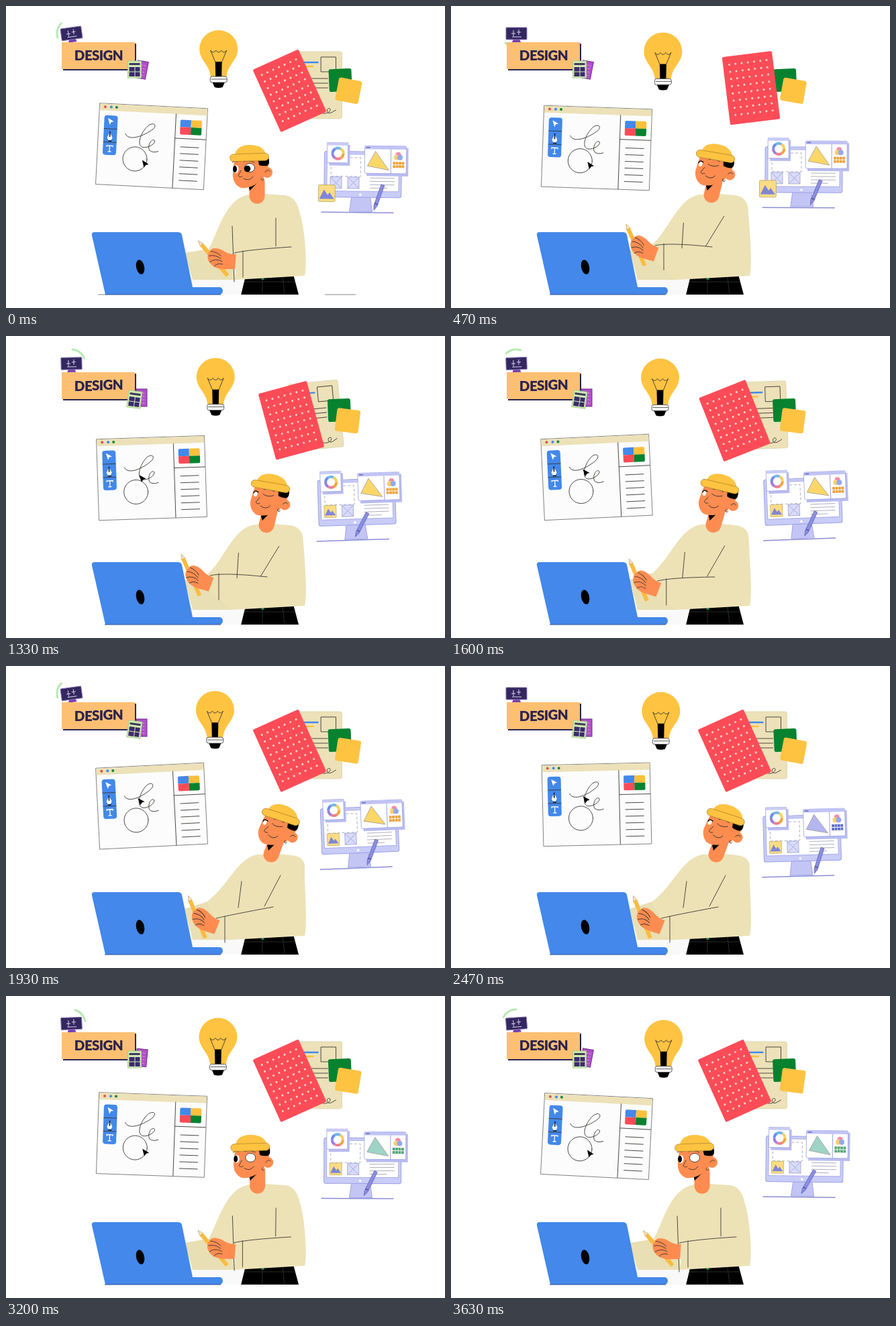
Recreate the animation shown at these times as an HTML page. Size 654 px wide and 450 px high, loop 3660 ms.

```html
<!DOCTYPE html>
<html lang="en">
<head>
<meta charset="utf-8">
<title>Design desk</title>
<style>
html, body { margin: 0; width: 100%; height: 100%; overflow: hidden; background: #fff; }
svg { display: block; width: 654px; height: 450px; }
.ln { fill: none; stroke: #3b3935; stroke-width: .9; stroke-linecap: round; stroke-linejoin: round; }
.skin { fill: #fe8c50; }
.lav { fill: #fff; stroke: #9da1e2; stroke-width: .8; }
.word { font: 900 20.5px Lato, "Open Sans", sans-serif; letter-spacing: -.6px; fill: #2b2350; text-anchor: middle; }
</style>
</head>
<body>
<svg viewBox="0 0 654 450">
  <!-- sign -->
  <path id="swoosh" d="M18 -11A21 21 0 0 1 18 11" fill="none" stroke="#a9e6a6" stroke-width="3" stroke-linecap="round" opacity=".85"/>
  <g id="mini">
    <path d="M-4 8H5L7 13H-6Z" fill="#7a3fb0"/>
    <rect x="-15" y="-9" width="31" height="18" rx="1" fill="#33275f" stroke="#8d79b8"/>
    <path d="M-4 -5V4M-7 0H-1M4 -6V2M1 -2H7M-6 5H8" stroke="#d9d3ee" fill="none"/>
  </g>
  <path d="M85 56H194V96H85Z" fill="#2a2350"/>
  <path d="M83 54H192V94H83Z" fill="#fdbf72"/>
  <text id="word" class="word" x="138" y="81">DESIGN</text>
  <g id="cardB">
    <rect x="-8" y="-13" width="16" height="26" fill="#b04fc6" stroke="#6b2f8e"/>
    <path d="M-5 -7H6M-5 -2H6M-5 3H6M-5 8H6" stroke="#e2a8ea" stroke-dasharray="2 1.5"/>
  </g>
  <g id="cardA">
    <rect x="-10" y="-12" width="20" height="25" fill="#d5eab4" stroke="#9fd08f"/>
    <path d="M-8 -9H8V-6H-8Z" fill="#3d3a5c"/>
    <path d="M-8 -3H0V3.500H-8ZM1 -3H8V3.500H1ZM-8 4.500H0V11H-8ZM1 4.500H8V11H1Z" fill="#3a2c6b"/>
  </g>

  <!-- bulb -->
  <g id="bulb">
    <path d="M-28.500 28.500A28.500 28.500 0 0 1 28.500 28.500C28 46 14 50 12 69H-12C-14 50 -28 46 -28.500 28.500Z" fill="#fec341"/>
    <path d="M-5 47H5L4.500 69H-4.500Z"/>
    <path class="ln" d="M-5 47L-12 30Q-8 36 -4 30Q0 36 4 30Q8 36 12 30L5 47"/>
    <rect x="-12.500" y="69" width="25" height="9" rx="3" fill="#fff" stroke="#333" stroke-width=".8"/>
    <path d="M-11 73H12" stroke="#333" stroke-width=".8"/>
    <path d="M-9 78H9L6 85Q0 87 -6 85Z"/>
  </g>

  <!-- drawing window -->
  <g id="win">
    <rect x="-80.500" y="-60.500" width="161" height="121" fill="#fcfcfc" stroke="#666" stroke-width=".8"/>
    <path d="M-80 -60H80V-50H-80Z" fill="#ece1b8"/>
    <circle cx="-72" cy="-55.500" r="2" fill="#e2533f"/>
    <circle cx="-63" cy="-55.500" r="2" fill="#4388ea"/>
    <circle cx="-55" cy="-55.500" r="2" fill="#16853c"/>
    <rect x="-72.500" y="-43" width="20" height="59" rx="4" fill="#4388ea"/>
    <path class="ln" d="M-72 -23H-53M-72 -3H-53M34 -50V60M34 -14H80"/>
    <path id="rows" class="ln"/>
    <path d="M-67 -39L-58 -34L-62 -33L-64 -29Z" fill="#fff"/>
    <path d="M-63 -18L-59 -10L-61 -6H-65L-67 -10Z" fill="#fff"/>
    <path d="M-65 -5H-60M-63 -19V-11" stroke="#111" stroke-width="1.500"/>
    <path d="M-67 4V2H-58V4M-62.500 2V11M-65 11H-60" fill="none" stroke="#fff" stroke-width="1.300"/>
    <path d="M57 -42V-31H41V-40Q41 -42 43 -42Z" fill="#4388ea"/>
    <path d="M57 -42V-31H73V-40Q73 -42 71 -42Z" fill="#fdc03c"/>
    <path d="M57 -20V-31H41V-22Q41 -20 43 -20Z" fill="#fc4b58"/>
    <path d="M57 -20V-31H73V-22Q73 -20 71 -20Z" fill="#07822f"/>
    <circle class="ln" cx="-24" cy="20" r="18"/>
    <path class="ln" d="M-40 -17C-35 -5 -12 -15 1 -26C8 -34 -2 -37 -9 -28C-19 -16 -22 0 -13 2C-4 3 6 -5 4 -9C-1 -13 -7 0 -3 6Q2 10 10 7"/>
    <path id="cursor" d="M-4 -5L6 1L2 2L-1 6Z"/>
  </g>

  <!-- folder -->
  <g id="doc">
    <rect x="-37" y="-50" width="74" height="100" rx="3" fill="#ece1b8" stroke="#d8cfaa" stroke-width=".7"/>
    <path d="M-22 -34H2" stroke="#4388ea" stroke-width="2.500"/>
    <path d="M-18 -28H-5" stroke="#fdc03c" stroke-width="2.500"/>
    <path class="ln" d="M6 -42H28V-20H6ZM-8 -10H16M-8 -3H16M-8 4H16M5 41C14 45 22 38 19 35C14 32 12 44 21 41L28 37"/>
  </g>
  <rect id="green" x="-17" y="-17" width="34" height="34" rx="3" fill="#07822f"/>
  <rect id="gold" x="-17.500" y="-17" width="35" height="34.500" rx="3" fill="#fec341"/>
  <g id="book">
    <rect x="-37.300" y="-51" width="74.600" height="102" rx="2" fill="#fd4c58"/>
  </g>

  <!-- big monitor -->
  <g id="mon">
    <path d="M-3 20H25L28 42H-6Z" fill="#c3c5f5" stroke="#a3a6e4"/>
    <path d="M-48 43.500H60" stroke="#8b8ed6" stroke-width="1.500"/>
    <rect x="-44" y="-47" width="115" height="68" rx="3" fill="#c9ccf7" stroke="#9da1e2"/>
    <path class="lav" d="M-40 -43H67V12H-40Z"/>
    <circle cx="10" cy="17" r="1.800" fill="#fff"/>
    <rect x="-34" y="-38" width="44" height="28" fill="none" stroke="#9c9eb8" stroke-dasharray="4 3" stroke-width=".8"/>
    <path d="M-35 -9h17v17h-17ZM-9 -9H8V8H-9ZM-35 -9l17 17M-18 -9l-17 17M-9 -9L8 8M8 -9L-9 8" fill="#d9dbfa" stroke="#9da1cc" stroke-width=".8"/>
    <path d="M24 -8H61M24 -3H61M24 2H61M24 7H50" stroke="#b0b0bf"/>
    <path d="M-37 -57h31v31h-31Z" fill="#b9bcf0"/>
    <path class="lav" d="M-40 -60h31v30h-31Z"/>
    <path d="M-40 -60h31v4h-31Z" fill="#c9ccf7"/>
    <g id="ring" fill="none" stroke-width="4"></g>
    <path d="M19 -53h62v42h-62Z" fill="#b9bcf0"/>
    <rect class="lav" x="16" y="-56" width="62" height="41" rx="2"/>
    <path d="M16 -56H78V-51H16Z" fill="#c0c3f4"/>
    <path d="M55 -51V-15" stroke="#9da1e2"/>
    <path d="M18 -53.500h6" stroke="#6669b8" stroke-width="1.500"/>
    <g opacity=".75"><circle cx="66" cy="-43" r="4" fill="#f0648c"/><circle cx="63.500" cy="-39" r="4" fill="#fdc03c"/><circle cx="68.500" cy="-39" r="4" fill="#6d8df0"/></g>
    <path id="swatch" d="M58 -30.500H75M58 -25.500H75" stroke-width="4" stroke-dasharray="3.800 .6"/>
    <path id="tri" d="M32 -48L52 -20L20 -26Z" stroke="#a09c9c" stroke-width=".8"/>
    <g id="pic">
      <rect x="-9" y="-9" width="18" height="18" rx="1" fill="#fbdc84" stroke="#b9a86a" stroke-width=".6"/>
      <path d="M-8 6L-3 -4L1 2L3 -1L8 6Z" fill="#7f86d6"/>
    </g>
    <g id="pen">
      <path d="M-2.500 -20H2.500V13L0 20L-2.500 13Z" fill="#8a8ee0" stroke="#6a6dbc" stroke-width=".8"/>
      <path d="M-2.500 10H2.500" stroke="#3d3f88"/>
    </g>
  </g>

  <!-- person -->
  <path d="M357 400H428L436 430H350Z"/>
  <path d="M355 411H431M382 404V429M412 404L415 429" fill="none" stroke="#2d3a36" stroke-width=".8"/>
  <path d="M380.500 405h4v3h-4Z" fill="#16853c"/>
  <path d="M276 405L358 398L350 430H276Z" fill="#f9f9f9"/>
  <path id="sleeve" fill="#e9dfb4"/>
  <path id="torso" fill="#ede2b6"/>
  <path id="folds" class="ln"/>
  <path id="neck" fill="none" stroke="#fe8c50" stroke-width="23" stroke-linecap="round"/>
  <path id="shade"/>
  <g id="head">
    <circle class="skin" cx="389" cy="248" r="8"/>
    <path class="skin" d="M341 229C338 238 339 244 338 250C337 259 342 268 350 271C360 273 375 266 383 257L391 238L388 226Z"/>
    <path d="M375 227L391 225Q394 236 389 238Q382 239 377 237Z"/>
    <path class="ln" d="M386 248Q389 242 393 246M350 245L346 253Q348 256 352 254M354 257Q363 262 368 254"/>
    <path class="ln" d="M381 256a2 2 0 1 0 3 2" stroke="#8a5a14"/>
    <g id="open">
      <path class="ln" d="M337 233Q341 230 345 232M354 232Q362 229 370 233"/>
      <ellipse cx="363" cy="241" rx="7.500" ry="6.500" fill="#fff" stroke="#222" stroke-width=".8"/>
      <ellipse cx="342.500" cy="243" rx="4" ry="6" fill="#fff"/>
      <ellipse cx="341" cy="243" rx="3" ry="5"/>
      <circle id="pupil" cx="359.500" cy="242.500" r="4.800"/>
    </g>
    <g id="wink">
      <path class="ln" d="M354 239Q361 243 370 238M354 232Q362 229 370 232"/>
      <g id="half"><ellipse cx="343" cy="241" rx="2.800" ry="4" fill="#fff"/><path d="M340 241Q340 235 347 238" fill="none" stroke="#111" stroke-width="1.500"/></g>
      <path id="shut" class="ln" d="M339 240Q343 243 347 240" stroke-width="1.800"/>
    </g>
    <path d="M341 223C341 212 352 207 363 207C376 207 386 212 387 222Z" fill="#fec341"/>
    <rect x="333.500" y="220" width="58" height="11" rx="5.500" fill="#fec341" stroke="#a98226" stroke-width=".7" transform="rotate(-2 363 225)"/>
  </g>
  <g id="hand">
    <g transform="translate(-33 -2) rotate(-44)">
      <path d="M-3 -26H3V34H-3Z" fill="#fbbb3f"/>
      <path d="M-3 -26L0 -34L3 -26Z" fill="#f6e3c0" stroke="#b78b3a" stroke-width=".5"/>
    </g>
    <path class="skin" d="M1 -10C-8 -9 -14 -12 -20 -15C-27 -18 -37 -18 -38 -12C-42 -8 -42 0 -37 5C-32 12 -22 14 -12 13L1 12Z"/>
    <path class="ln" d="M-37 -12Q-28 -12 -21 -6M-39 -5Q-30 -8 -21 -2M-37 4Q-29 -3 -19 2M-30 10Q-26 4 -18 6"/>
  </g>

  <!-- laptop -->
  <path d="M128 342Q127 337 132 337H256Q261 337 262 341L278 419H319Q323 420 323 425Q322 430 318 430H148Z" fill="#4388ea"/>
  <path d="M147 430H320" stroke="#2a4f94"/>
  <ellipse cx="200" cy="389" rx="6" ry="11" transform="rotate(-12 200 389)"/>
  <path id="floor" d="M137 430H147M475 430H521" stroke="#777" stroke-width=".9"/>
</svg>
<script>
const LOOP = 3660, TAU = Math.PI * 2;
const { sin, cos, floor, max, min } = Math;
const $ = id => document.getElementById(id);
const set = (id, name, v) => $(id).setAttribute(name, v);
const place = (id, x, y, r = 0, s = 1) => set(id, 'transform', `translate(${x} ${y}) rotate(${r}) scale(${s})`);
const show = (id, on) => { $(id).style.display = on ? '' : 'none'; };
const lerp = (a, b, k) => a + (b - a) * k;
const rep = (n, f) => Array.from({ length: n }, (_, i) => f(i)).join('');

// Smooth 0 to 1 between times a and b.
function ease(t, a, b) {
  const k = max(0, min(1, (t - a) / (b - a)));
  return k * k * (3 - 2 * k);
}
// Follow key points [time, ...values].
function along(keys, t) {
  const i = max(1, keys.findIndex(k => k[0] > t)), a = keys[i - 1], b = keys[i];
  return a.slice(1).map((v, n) => lerp(v, b[n + 1], ease(t, a[0], b[0])));
}

// Body lean, cuff x, cuff y, hand angle.
const down = [0, 340, 368, 4], side = [.67, 304, 357, 20], lean = [1, 313, 376, 22], turn = [.68, 326, 361, 12];
const poses = [[0, ...down], [60, ...down], [450, ...side], [1400, ...side], [1850, ...lean],
  [2520, ...lean], [2830, ...turn], [3250, ...down], [LOOP, ...down]];

function drawPerson(t) {
  const [s, x, y, r] = along(poses, t);
  const elbow = `${302 - 2 * s} ${362 - 11 * s}`, cuff = `${x} ${y}`, hem = `${341 - 7 * s} 408`;
  set('torso', 'd', `M${362 + 12 * s} 281C${326 + 18 * s} 287 ${316 + 17 * s} ${338 - 13 * s} ${elbow}
    L${cuff}l2 25L${hem}L445 402C450 385 444 325 ${438 + 7 * s} ${310 - 12 * s}
    Q${433 + 11 * s} 284 ${416 + 10 * s} 282L${386 + 21 * s} 280Z`);
  set('sleeve', 'd', `M266 ${368 - 6 * s}L${elbow}L${cuff}L${hem}L278 408Z`);
  set('folds', 'd', `M${337 + 14 * s} ${328 - 7 * s}L${340 + 6 * s} ${max(360, 411 - 75 * s)}
    M${402 + 7 * s} ${316 - 4 * s}L${402 - (340 - x) * .63} 358
    M${cuff}Q${x + 20} ${y - 5} ${x + 85} 359M${x + 13} ${y - 3}l0 39`);
  const nx = 374 + 28 * s;
  set('neck', 'd', `M${nx} 262L${374 + 21 * s} ${283 - 2 * s}`);
  set('shade', 'd', `M${nx - 13} 267L${nx + 3} 261L${nx - 11} 275Z`);
  set('head', 'transform', `translate(${363 + 49 * s} ${219 - 6 * s * (1 - s)}) rotate(${20 * s ** 1.3}) translate(-363 -219)`);
  place('hand', x + 1, y + 12, r);
  const open = t < 220 || t > 3150, shut = t > 2700;
  show('open', open);
  show('wink', !open);
  show('half', !shut);
  show('shut', shut);
  show('pupil', t < 220);
}

function drawSign(t) {
  place('swoosh', 97, 41, 195 - t * .1865);
  place('mini', 97, 41, -4 - 4 * cos(t / 965 * TAU));
  const swap = ease(t, 600, 1200);
  place('cardA', 191.5, 94, 8 * (swap - ease(t, 2300, 2800)));
  place('cardB', 202, 92 + 3 * (1 - swap), 11 * (1 - swap + ease(t, 2900, 3500)));
  const tilt = 1.3 * (ease(t, 200, 1900) - ease(t, 2300, 2830));
  const lift = i => i < 0 ? 0 : -tilt * sin((i - 2.5) * .62);
  set('word', 'dy', rep(6, i => lift(i) - lift(i - 1) + ' '));
}

function drawFolder(t) {
  const shut = ease(t, 0, 470), slide = shut - ease(t, 850, 1450), spin = shut - ease(t, 850, 1850);
  place('book', 422.5 + 24.5 * slide, 126.2 - 4 * slide, -24.3 + 17.3 * spin);
  place('doc', 463.5 - 16.5 * slide, 118 + 4 * slide, -7 * spin * (2 - spin));
  const sway = cos(t / 420);
  place('green', 497.3 + .8 * sway, 110.5, -2.5);
  place('gold', 509.7 + .7 * sway, 126, 9 + 2 * sway);
}

const drift = [[0, 518, 264], [470, 512, 257], [1330, 509.5, 261], [1930, 514, 258],
  [2470, 510, 270], [2830, 521, 260], [LOOP, 513, 256]];
function drawMonitor(t, a) {
  place('mon', ...along(drift, t), -.8 + 1.5 * cos(a));
  const snap = ease(t, 700, 1200);
  place('pic', -40 + 13.5 * snap, 15.5 - 16 * snap, 0, 1.38 - .38 * snap);
  place('pen', 28 + 9 * cos(1.5 * a), 21, 24 - 5 * cos(1.5 * a));
  const hue = t < 2200 ? 0 : t < 2700 ? 1 : 2;
  set('tri', 'fill', ['#fbd768', '#b4b6f0', '#9ed3c5'][hue]);
  set('swatch', 'stroke', ['#eda23c', '#5f6cc8', '#55a878'][hue]);
}

function draw(t) {
  const a = t / LOOP * TAU;
  drawSign(t);
  place('bulb', 314 + 2.7 * cos(a), 36 + 3.4 * sin(2 * a));
  place('win', 217, 209.2 + 3.2 * sin(a), 2.9 * cos(a));
  const move = ease(t, 950, 1500) - ease(t, 2500, 2800);
  place('cursor', -9 - 7 * move, 26 - 34 * move);
  drawFolder(t);
  drawMonitor(t, a);
  drawPerson(t);
  show('floor', t < 30);
}

set('rows', 'd', rep(6, i => `M43 ${10 * i - 1.5}h27`));
$('book').innerHTML += rep(56, i =>
  `<circle cx="${-28 + i % 7 * 9.3}" cy="${-38.5 + floor(i / 7) * 10.8}" r="1.5" fill="#fbd9c8"/>`);
const hues = ['#f2a53c', '#ee7f8e', '#9b7fe0', '#6d8df0', '#73b7e8', '#f6cf62'];
$('ring').innerHTML = rep(6, i =>
  `<path d="M8 0A8 8 0 0 1 4 6.930" stroke="${hues[i]}" transform="translate(-24 -44) rotate(${i * 60})"/>`);

let start;
function tick(now) {
  start ??= now;
  draw((now - start) % LOOP);
  requestAnimationFrame(tick);
}
draw(0);
requestAnimationFrame(tick);
</script>
</body>
</html>
```
